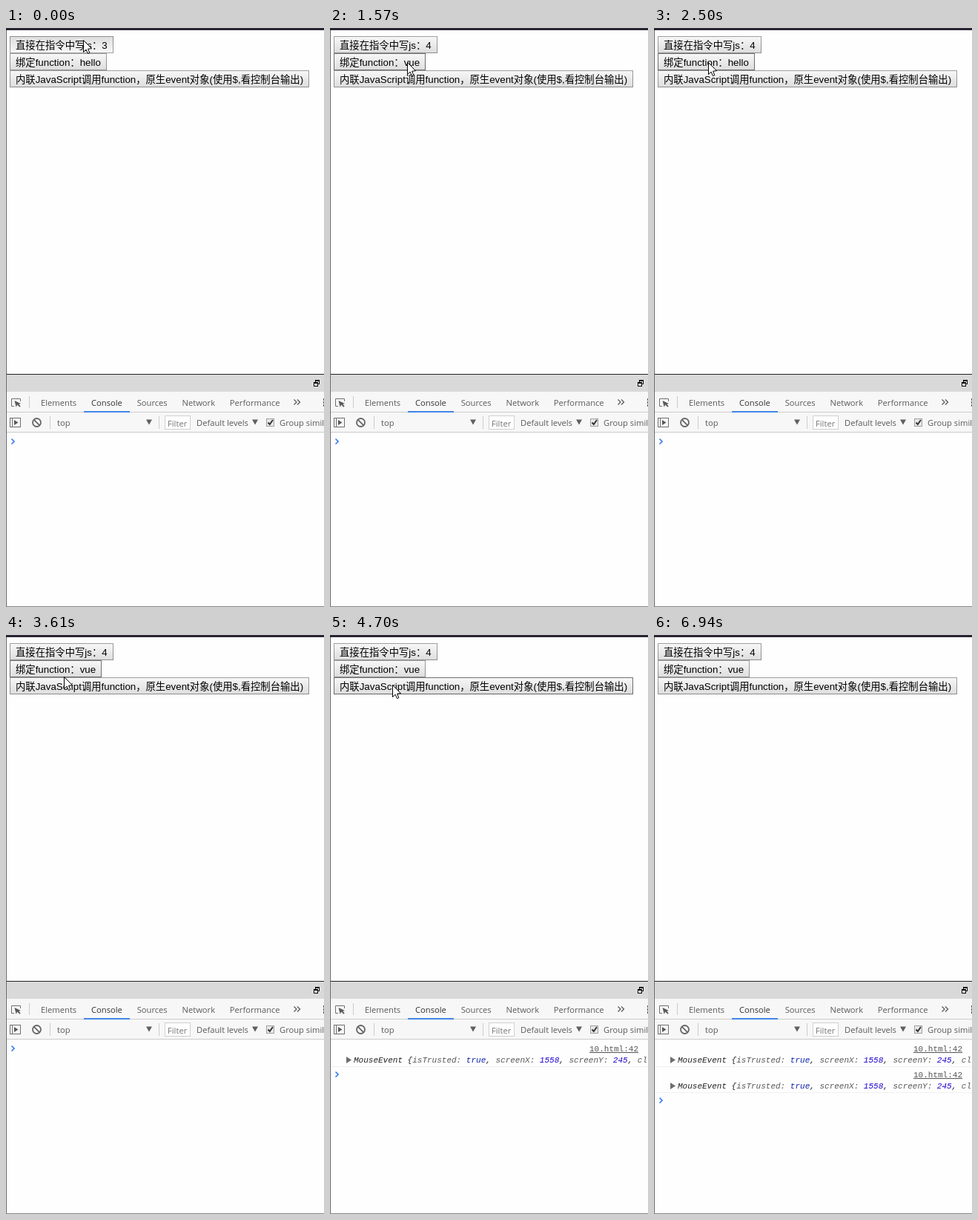
Write an HTML page with a canvas that moves like this. It is 429x780 px and loops after 7.33 s.

```html
<!DOCTYPE html>
<html lang="zh-CN">
<head>
<meta charset="utf-8">
<title>Event handling demo</title>
<style>
html, body { margin: 0; width: 100%; height: 100%; overflow: hidden; background: #fff; }
canvas { display: block; }
</style>
</head>
<body>
<canvas id="stage" width="429" height="780"></canvas>
<script>
const ctx = document.getElementById('stage').getContext('2d');
const LOOP = 7330;
const STEP = 142;
const HOLD = 130;
const ROW = 23;
const TOP = 11;
const GRAY = '#5a5a5a';
const BUTTON_FONT = '13.333px "Liberation Sans", "Noto Sans CJK SC", "Noto Sans CJK", sans-serif';
const UI_FONT = '11.2px "Open Sans", "Noto Sans", sans-serif';
const MONO = '11px "Liberation Mono", monospace';

// Each leg moves the pointer to x, y in discrete steps; power > 1 slows down, < 1 speeds up
const START = { x: 104, y: 16 };
const LEGS = [
  { at: 440, x: 104, y: 43, steps: 2 },
  { at: 1570, x: 104, y: 46 },
  { at: 1690, x: 80, y: 49, steps: 2, power: .3 },
  { at: 1990, x: 75, y: 59 },
  { at: 2240, x: 73, y: 46 },
  { at: 3610, x: 78, y: 56 },
  { at: 3770, x: 83, y: 63 },
  { at: 4450, x: 84, y: 67 },
  { at: 6230, x: 403, y: 766, steps: 5, power: 2.2 }
];
const POINTER_GONE = 6940;

// Click times are the moments of release
const COUNT_CLICK = 120;
const GREETING_CLICKS = [1140, 2500, 3310];
const LOG_CLICKS = [4700, 5670];
const PRESSES = [COUNT_CLICK, ...GREETING_CLICKS, LOG_CLICKS[0]];

const countPast = (times, t) => times.filter(time => t >= time).length;

function pointerAt(t) {
  let { x, y } = START;
  for (const { at, x: toX, y: toY, steps = 1, power = 1 } of LEGS) {
    if (t < at) break;
    const done = Math.min(1, (Math.floor((t - at) / STEP) + 1) / steps);
    const eased = 1 - (1 - done) ** power;
    x = Math.round(x + (toX - x) * eased);
    y = Math.round(y + (toY - y) * eased);
  }
  return { x, y };
}

function rect(x, y, w, h, color) {
  ctx.fillStyle = color;
  ctx.fillRect(x, y, w, h);
}

function frame(x, y, w, h, color) {
  ctx.strokeStyle = color;
  ctx.lineWidth = 1;
  ctx.strokeRect(x + .5, y + .5, w - 1, h - 1);
}

function text(str, x, y, color, font) {
  ctx.font = font;
  ctx.fillStyle = color;
  ctx.fillText(str, x, y);
  return x + ctx.measureText(str).width;
}

function trace(points) {
  ctx.beginPath();
  points.forEach(([x, y]) => ctx.lineTo(x, y));
}

function polygon(points, color) {
  trace(points);
  ctx.fillStyle = color;
  ctx.fill();
}

function line(points, color, width) {
  trace(points);
  ctx.strokeStyle = color;
  ctx.lineWidth = width;
  ctx.stroke();
}

function chevron(x, y, size, color, width) {
  line([[x, y - size], [x + size, y], [x, y + size]], color, width);
}

function triangleRight(x, y, w, h, color) {
  polygon([[x, y - h / 2], [x + w, y], [x, y + h / 2]], color);
}

function triangleDown(x, y) {
  polygon([[x, y], [x + 8, y], [x + 4, y + 7]], '#5f5f5f');
}

function button(y, width, label, hovered, pressed) {
  const fill = ctx.createLinearGradient(0, y, 0, y + ROW);
  fill.addColorStop(pressed ? 1 : 0, '#f8f8f8');
  fill.addColorStop(pressed ? 0 : 1, '#dddddd');
  rect(5, y, width, ROW, fill);
  frame(5, y, width, ROW, `rgba(0,0,0,${hovered && !pressed ? .53 : .36})`);
  text(label, 13, y + 17, '#000', BUTTON_FONT);
}

function drawButtons(t, pointer) {
  const held = PRESSES.some(release => t >= release - HOLD && t < release);
  const greeting = countPast(GREETING_CLICKS, t) % 2 ? 'vue' : 'hello';
  const labels = [
    '直接在指令中写js：' + (t < COUNT_CLICK ? 3 : 4),
    '绑定function：' + greeting,
    '内联JavaScript调用function，原生event对象(使用$,看控制台输出)'
  ];
  const hovered = Math.floor((pointer.y - TOP) / ROW);
  ctx.font = BUTTON_FONT;
  labels.forEach((label, i) => {
    const width = Math.round(ctx.measureText(label).width) + 16;
    button(TOP + ROW * i, width, label, i === hovered, i === hovered && held);
  });
}

function drawTabs() {
  rect(1, 490, 428, 27, '#f7f7f7');
  rect(1, 517, 428, 1, '#cccccc');
  line([[19.5, 503], [19.5, 499.5], [7.5, 499.5], [7.5, 509.5], [11, 509.5]], '#6e6e6e', 1);
  polygon([[11.5, 502], [20, 506], [15, 507.5], [13.7, 511]], GRAY);
  line([[14.5, 505.5], [19, 510]], GRAY, 1.8);
  rect(31, 496, 1, 16, '#cccccc');
  let x = 47;
  for (const name of ['Elements', 'Console', 'Sources', 'Network', 'Performance']) {
    x = text(name, x, 509, name === 'Console' ? '#333' : GRAY, UI_FONT) + 19.8;
  }
  rect(105, 516, 62, 2, '#4285e8');
  for (let i = 0; i < 2; i++) chevron(388.5 + 4.5 * i, 504, 3.5, GRAY, 1.3);
  for (let i = 0; i < 3; i++) rect(428, 499 + 4 * i, 1, 3, GRAY);
}

function drawToolbar() {
  rect(1, 518, 428, 26, '#f7f7f7');
  rect(1, 544, 428, 1, '#cccccc');
  frame(5, 525, 15, 13, '#6e6e6e');
  rect(8, 526, 1, 11, '#6e6e6e');
  triangleRight(11, 531.5, 5.5, 7, GRAY);

  ctx.beginPath();
  ctx.arc(41.5, 531.5, 5.5, 0, 2 * Math.PI);
  ctx.strokeStyle = '#666';
  ctx.lineWidth = 1.8;
  ctx.stroke();
  line([[37.6, 527.6], [45.4, 535.4]], '#666', 1.8);

  rect(59, 523, 1, 17, '#cccccc');
  rect(206, 523, 1, 17, '#cccccc');
  text('top', 69, 536, GRAY, UI_FONT);
  triangleDown(189, 527.5);
  rect(214, 522, 35, 19, '#fff');
  frame(214, 522, 35, 19, '#d0d0d0');
  text('Filter', 218, 537, '#757575', UI_FONT);
  text('Default levels', 257, 536, GRAY, UI_FONT);
  triangleDown(332, 527.5);
  rect(351, 526, 11, 11, '#e8e8e8');
  frame(351, 526, 11, 11, '#a0a0a0');
  line([[353.5, 531.5], [355.8, 534], [360, 528]], '#333', 2);
  text('Group simil', 369, 536, GRAY, UI_FONT);
}

function drawLog(y) {
  const end = text('10.html:42', 350, y + 16, '#545454', MONO);
  rect(350, y + 17, end - 350, 1, '#545454');
  triangleRight(22, y + 27.5, 7, 9, '#6e6e6e');
  const font = 'italic ' + MONO;
  let x = text('MouseEvent {', 32, y + 31, '#222', font);
  for (const [key, value] of Object.entries({ isTrusted: true, screenX: 1558, screenY: 245 })) {
    x = text(key + ': ', x, y + 31, '#565656', font);
    x = text(String(value), x, y + 31, value === true ? '#0d22aa' : '#1c00cf', font);
    x = text(', ', x, y + 31, '#222', font);
  }
  text('cl', x, y + 31, '#565656', font);
  rect(1, y + 36, 428, 1, '#f0f0f0');
}

function drawConsole(t) {
  const count = countPast(LOG_CLICKS, t);
  for (let i = 0; i < count; i++) drawLog(545 + 35 * i);
  chevron(7.5, 557 + 35 * count, 3.5, '#367cf1', 1.7);
}

function smallWindow(x, y) {
  rect(x, y, 6, 6, '#fff');
  frame(x, y, 6, 6, '#000');
  rect(x, y, 6, 2, '#000');
}

function drawWindow() {
  rect(0, 0, 429, 780, '#fefefe');
  rect(0, 0, 429, 3, '#2b2533');
  rect(1, 466, 428, 1, '#222');
  rect(1, 467, 428, 23, '#d9d9d9');
  smallWindow(417, 474);
  smallWindow(415, 477);
}

function drawEdges() {
  rect(0, 3, 1, 777, '#6b6b6b');
  rect(0, 779, 429, 1, '#858585');
}

function drawPointer({ x, y }) {
  ctx.save();
  ctx.translate(x + .5, y + .5);
  polygon([[0, 0], [0, 16], [3.6, 12.6], [6, 18], [8.3, 17], [6.1, 11.7], [11, 11.2]], '#fff');
  ctx.closePath();
  ctx.strokeStyle = '#000';
  ctx.lineWidth = 1;
  ctx.stroke();
  ctx.restore();
}

function draw(t) {
  const pointer = pointerAt(t);
  drawWindow();
  drawButtons(t, pointer);
  drawTabs();
  drawToolbar();
  drawConsole(t);
  drawEdges();
  if (t < POINTER_GONE) drawPointer(pointer);
}

let begin;
function tick() {
  const now = performance.now();
  begin ??= now;
  draw((now - begin) % LOOP);
  requestAnimationFrame(tick);
}
tick();
</script>
</body>
</html>
```
